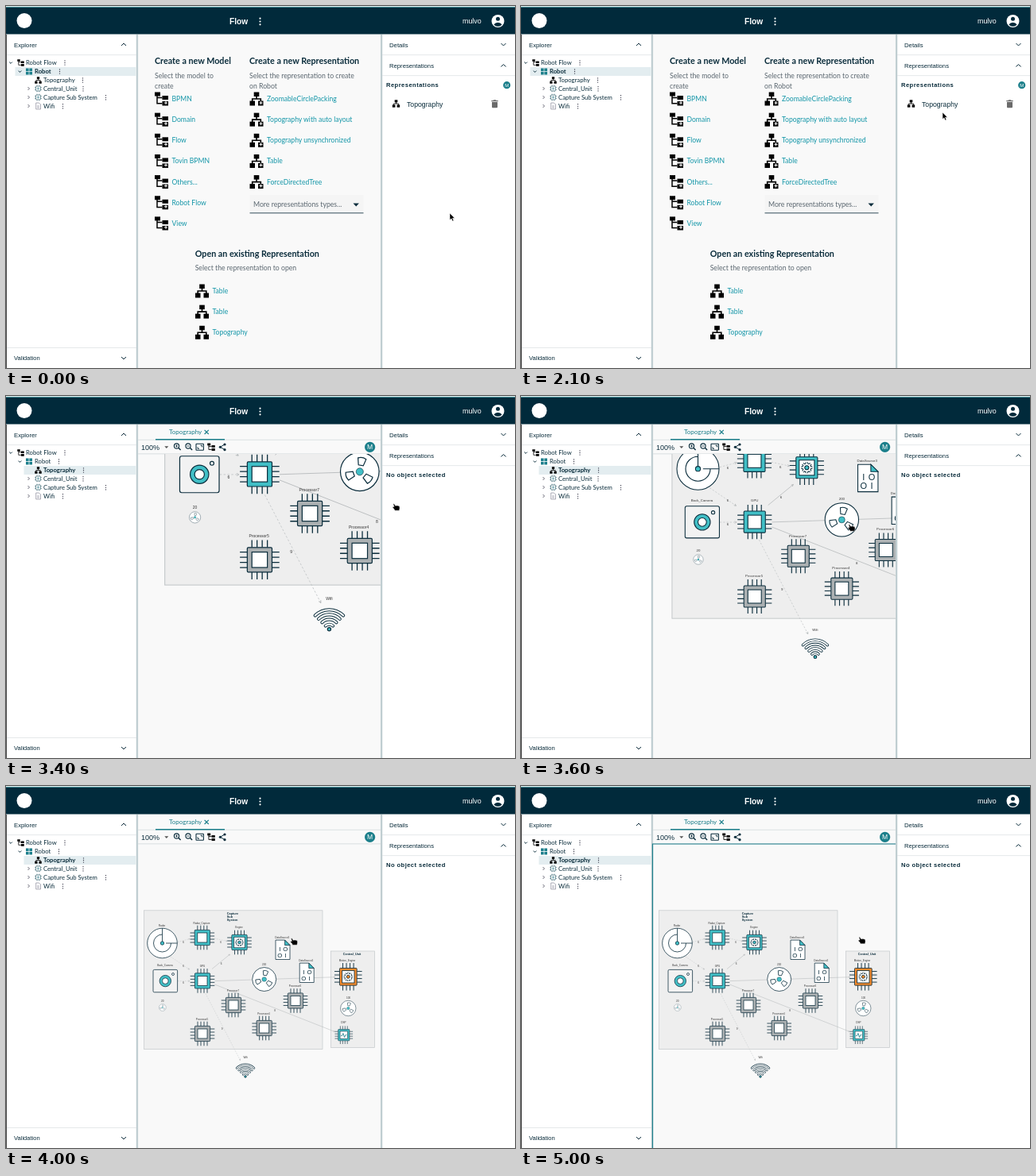
These frames come from a looping animation (640x456 px, 5.1 s). An HTML page:

```html
<!DOCTYPE html>
<html lang="en">
<head>
<meta charset="utf-8">
<title>Flow</title>
<style>
html, body { margin: 0; width: 100%; height: 100%; overflow: hidden; background: #fff; }
svg { display: block; width: 100vw; height: 100vh; }
text { font-family: "Liberation Sans", Arial, sans-serif; }
.lato { font-family: Lato, sans-serif; }
.line { fill: none; }
</style>
</head>
<body>
<svg id="stage" viewBox="0 0 640 456" xmlns="http://www.w3.org/2000/svg"></svg>
<script>
const LOOP = 5100, STEP = 100;
const OPEN = 2900, LOADED = 3400, FIT = 528, PICK = 4200, BLUR = 4700;
const INK = '#0b2d3c', TEAL = '#1c7f8b', LINK = '#1496a8', CHIP = '#41bfc6', GREY = '#abb0b2', ORANGE = '#f58b2c';

// Shape helpers; text is centred vertically on y.
const text = (x, y, s, size, fill = INK, more = '') =>
  `<text x="${x}" y="${y + size * .35}" font-size="${size}" fill="${fill}" ${more}>${s}</text>`;
const lato = (x, y, s, size, fill, more = '') => text(x, y, s, size, fill, 'class="lato" ' + more);
const rect = (x, y, w, h, fill, more = '') =>
  `<rect x="${x}" y="${y}" width="${w}" height="${h}" fill="${fill}" ${more}/>`;
const circle = (x, y, r, fill, more = '') => `<circle cx="${x}" cy="${y}" r="${r}" fill="${fill}" ${more}/>`;
const line = (d, stroke = INK, width = 1, more = '') =>
  `<path class="line" d="${d}" stroke="${stroke}" stroke-width="${width}" ${more}/>`;
const fill = (d, color = '#000') => `<path d="${d}" fill="${color}"/>`;
const at = (x, y, body, scale = 1) => `<g transform="translate(${x} ${y}) scale(${scale})">${body}</g>`;
const group = (id, body) => `<g id="${id}">${body}</g>`;
const bold = 'font-weight="700"', middle = 'text-anchor="middle"';

const chevron = (x, y, dir, r = 3) => line(`M${x - r} ${y - dir * r / 2}l${r} ${dir * r}l${r} ${-dir * r}`, INK, 1);
const arrowRight = (x, y) => line(`M${x - 1} ${y - 2}l2 2l-2 2`, '#445', .8);
const dots = (x, y, gap = 2.6, color = '#334', r = .65) =>
  [-1, 0, 1].map(i => circle(x, y + i * gap, r, color)).join('');
const badge = (x, y, r) => circle(x, y, r, TEAL) + text(x, y, 'M', r * 1.3, '#fff', middle);

// Icons centred on the origin, about 17 units wide
const plus = line('M5.5 3v4M3.5 5h4', '#fff', 1);
const modelIcon = rect(-8.5, -8.5, 7, 5, '#000') + rect(1, -4, 7.5, 5, '#000') + rect(1, 3, 7.5, 5.5, '#000') +
  line('M-5.5 -4V5.7H1M-5.5 -1.5H1', '#000', 1.5);
const lanIcon = rect(-3.3, -8.5, 6.6, 5.5, '#000') + rect(-8.5, 2.5, 6.5, 6, '#000') + rect(2, 2.5, 6.5, 6, '#000') +
  line('M0 -4V0M-5.3 3V0H5.3V3', '#000', 1.6);

function header() {
  return rect(0, 0, 640, 35.5, '#012a3b') + rect(0, 0, 640, 2, '#3f8a92') + rect(0, 0, 640, 1, '#e4eced') +
    circle(23, 18.5, 9.5, '#fff') +
    text(281, 19.3, 'Flow', 10.2, '#fff', bold) + dots(319.5, 19.5, 3.8, '#fff', 1.1) +
    text(574, 19.3, 'mulvo', 8.9, '#fff') +
    circle(618.5, 19, 8, '#fff') + circle(618.5, 16.3, 2.5, '#012a3b') +
    fill('M613.4 23.4Q615 20.8 618.5 20.8T623.6 23.4Q621.5 25.7 618.5 25.7T613.4 23.4', '#012a3b');
}

function panels() {
  const rule = (x, y, w) => rect(x, y, w, .8, '#dfe3e5');
  const sash = x => rect(x - 1.2, 36, 2.6, 420, '#dde4e6') + rect(x - .5, 36, 1.2, 420, '#aebfc3');
  return rect(0, 35, 640, 421, '#fff') + rect(165, 35, 306, 421, '#f9f9f9') +
    sash(164.8) + sash(472) + rect(0, 36, .9, 420, '#333') +
    text(10, 48.8, 'Explorer', 7.75) + chevron(148, 48.5, -1) + rule(1, 61.3, 163) +
    rule(1, 430, 163) + text(10, 443.6, 'Validation', 7.6) + chevron(148, 443.5, 1) +
    text(482, 48.8, 'Details', 7.75) + chevron(625.5, 48.5, 1) + rule(473, 61.3, 167) +
    text(482, 75, 'Representations', 7.7) + chevron(625.5, 75, -1) + rule(473, 87.3, 167);
}

function tree() {
  const cpu = rect(-3, -3, 6, 6, '#fff', 'rx="1" stroke="#4d7681" stroke-width=".8"') +
    rect(-1.4, -1.4, 2.8, 2.8, '#8fb9c0') +
    line('M-1.5 -4.4v1.4M1.5 -4.4v1.4M-1.5 3v1.4M1.5 3v1.4M-4.4 -1.5h1.4M-4.4 1.5h1.4M3 -1.5h1.4M3 1.5h1.4', '#4d7681', .6);
  const doc = line('M-2.8 -4H1L3 -2V4H-2.8Z', '#889', .7) + line('M-1.5 0h3M-1.5 2h3', '#889', .7);
  const grid = [[-4, -4], [.4, -4], [-4, .4], [.4, .4]].map(([x, y]) => rect(x, y, 3.6, 3.6, TEAL)).join('');
  const label = (x, y, s, end, on) => lato(x, y, s, 7.7, INK, on ? bold : '') + dots(end, y);
  const mark = (x, y) => rect(x, y, 163.5 - x, 11, '#e3edf0');
  return group('rowRobot', mark(11.5, 77) + label(36, 82.5, 'Robot', 67.5, true) + label(47, 93.5, 'Topography', 96.5)) +
    group('rowTopo', mark(22.5, 88) + label(36, 82.5, 'Robot', 66.5) + label(47, 93.5, 'Topography', 97.5, true)) +
    label(25, 71.5, 'Robot Flow', 74) + label(47, 104.3, 'Central_Unit', 97) +
    label(47, 115.3, 'Capture Sub System', 125.5) + label(47, 126.3, 'Wifi', 71.5) +
    chevron(6, 71.5, 1, 1.8) + chevron(17.5, 82.5, 1, 1.8) +
    [104, 115, 126].map(y => arrowRight(28.5, y)).join('') +
    at(18.5, 71.5, modelIcon, .5) + at(29, 82.5, grid) + at(40.5, 93.5, lanIcon, .5) +
    at(40.5, 104, cpu) + at(40.5, 115, cpu) + at(40.5, 126, doc);
}

function home() {
  const list = (x, top, icon, names) => names.map((s, i) => {
    const y = top + i * 26.15;
    return at(x + 8.5, y, icon) + lato(x + 21.5, y, s, 8.6, LINK);
  }).join('');
  const head = (x, y, s) => lato(x, y, s, 10.75, INK, bold);
  const note = (x, y, s) => lato(x, y, s, 8.7, '#5b6770');
  return head(187, 69.5, 'Create a new Model') + note(187, 88, 'Select the model to') + note(187, 100.5, 'create') +
    list(187, 117, modelIcon + plus, ['BPMN', 'Domain', 'Flow', 'Tovin BPMN', 'Others...', 'Robot Flow', 'View']) +
    head(306, 69.5, 'Create a new Representation') + note(306, 88, 'Select the representation to create') + note(306, 100.5, 'on Robot') +
    list(306.5, 117, lanIcon + plus, ['ZoomableCirclePacking', 'Topography with auto layout', 'Topography unsynchronized', 'Table', 'ForceDirectedTree']) +
    rect(306.5, 238, 143, 23, '#f5f5f5') + rect(306.5, 260.3, 143, 1, '#35505c') +
    note(311, 250.3, 'More representations types...') + fill('M436.5 248.5h7.4l-3.7 4z', INK) +
    head(237.7, 312, 'Open an existing Representation') + note(237.7, 330, 'Select the representation to open') +
    list(238, 359, lanIcon, ['Table', 'Table', 'Topography']) +
    text(478, 99.7, 'Representations', 7.6, INK, bold + ' letter-spacing=".45"') + badge(629.7, 99.7, 4.6) +
    at(490.5, 123, lanIcon, .55) + text(504, 123.8, 'Topography', 8.7) +
    fill('M611 121h7v6.3q0 1-1 1h-5q-1 0-1-1zM610.3 119h2.2l.6-.7h2.8l.6.7h2.2v1.2h-8.4z', '#6b6b6b');
}

function editor() {
  const lens = (x, sign) => circle(x, 63, 3.1, 'none', `stroke="${INK}" stroke-width="1.1"`) +
    line(`M${x + 2.3} 65.3l2.8 2.8`, INK, 1.4) + line(`M${x - 1.6} 63h3.2${sign}`, INK, .8);
  return rect(166, 54.8, 305, .8, '#d5dcde') + lato(205, 45.5, 'Topography', 8, TEAL) +
    line('M249.6 42.8l5.2 5.2m0-5.2l-5.2 5.2', TEAL, 1.2) + rect(188, 54, 87, 1.5, TEAL) +
    text(170, 64.6, '100%', 9) + fill('M199.3 63.3h5l-2.5 2.7z', '#555') +
    lens(214.5, 'm-1.6-1.6v3.2') + lens(229, '') +
    rect(239, 60.3, 9.4, 8, 'none', `stroke="${INK}" stroke-width="1.1" rx=".6"`) +
    line('M241 64.3v2h2M244.5 62.3h2v2', INK, .9) +
    at(258, 64.3, modelIcon, .56) +
    line('M275.3 60.8L269.3 64.3L275.3 67.8', INK, 1) +
    circle(269.4, 64.3, 1.6, INK) + circle(275, 61, 1.6, INK) + circle(275, 67.7, 1.6, INK) +
    rect(166, 72.5, 305, .8, '#cfd8da') +
    text(478, 99.7, 'No object selected', 7.6, INK, bold + ' letter-spacing=".43"');
}

// Diagram parts
const edge = `stroke="${INK}" stroke-width=".75"`;
const caption = (x, y, s) => text(x, y, s, 3.1, '#333', middle);

function gear(r, color) {
  const teeth = [0, 1, 2, 3, 4, 5, 6, 7].map(i => {
    const a = i * Math.PI / 4;
    return `M0 0L${Math.cos(a) * r} ${Math.sin(a) * r}`;
  }).join('');
  return line(teeth, INK, 2.4) + circle(0, 0, r * .82, INK) +
    line(teeth, '#fff', 1.1) + circle(0, 0, r * .82 - .65, '#fff') + circle(0, 0, r * .36, color, edge);
}

function chip(x, y, color, core = rect(-6, -6, 12, 12, '#fff', edge), scale = 1) {
  const pins = [-6, -2, 2, 6].map(p => `M${p} -15.3V-9.6M${p} 9.6V15.3M-15.3 ${p}H-9.6M9.6 ${p}H15.3`).join('');
  return at(x, y, line(pins, INK, .8) + rect(-9.6, -9.6, 19.2, 19.2, color, edge + ' rx=".8"') + core, scale);
}

function fan(x, y, r) {
  const blade = 'M-1.9 -5L-3.2 -10.4Q0 -12 3.2 -10.4L1.9 -5Z';
  return at(x, y, circle(0, 0, 15, '#fff', edge) +
    [10, 130, 250].map(a => `<path d="${blade}" fill="#fff" ${edge} transform="rotate(${a})"/>`).join('') +
    circle(0, 0, 2.8, CHIP, 'stroke="#0b2d3c" stroke-width=".4"'), r / 15);
}

function dataDoc(x, y) {
  const bits = (dy, a, b) => text(-3.8, dy, a, 7.8, INK, middle) + text(3.4, dy, b, 7.8, INK, middle);
  return at(x, y, `<path d="M-9 -12.2H2.6L9 -5.8V12.2H-9Z" fill="#fff" ${edge}/>` +
    `<path d="M2.6 -12.2V-5.8H9Z" fill="${CHIP}" ${edge}/>` + bits(-1, 'I', 'O') + bits(7, 'O', 'I'));
}

const radar = circle(0, 0, 18.8, '#fff', edge) +
  line('M0 0V-11A11 11 0 1 0 11 0M0 -18.8V-11M4.5 0H18.8', INK, .8) + circle(0, 0, 2.2, CHIP, edge);
const camera = rect(-15.3, -14.2, 30.6, 28.4, '#f2f2f2', edge + ' rx="1.5"') + circle(0, 0, 7.2, CHIP, edge) +
  circle(0, 0, 3.8, '#fff', edge) + circle(9.7, -8.6, 1.5, '#fff', edge);
const wifi = [15.5, 11.7, 7.9, 4.1].map(r => {
  const s = r * Math.SQRT1_2, arc = `M${-s} ${6.3 - s}A${r} ${r} 0 0 1 ${s} ${6.3 - s}`;
  return line(arc, INK, 2.5, 'stroke-linecap="round"') + line(arc, '#fff', 1.3, 'stroke-linecap="round"');
}).join('') + circle(0, 6, 1.3, CHIP, edge);

function diagram() {
  const box = (x, y, w, h) => rect(x, y, w, h, '#eee', 'stroke="#c4c8ca" stroke-width=".7"');
  const link = (d, dash = '') => line(d, dash ? '#bfc3c5' : '#b0b4b6', .5, (dash && 'stroke-dasharray="1.6 1.4" ') + 'marker-end="url(#tip)"');
  const wave = rect(-6.4, -6.4, 12.8, 12.8, '#fff', edge) + line('M-5 1h2.2l1.6-4 2.2 7 1.6-4H5', TEAL, 1.1);
  const cog = color => rect(-6.8, -6.8, 13.6, 13.6, '#fff', edge) + gear(5, color);
  const title = (x, y, s, anchor = '') => text(x, y, s, 3.8, INK, bold + anchor);
  return box(173.4, 156.8, 224.6, 174.8) + box(408.5, 208, 55, 121.5) +
    ['Capture', 'Sub', 'System'].map((s, i) => title(277.8, 160.6 + i * 3.9, s)).join('') +
    title(435, 212, 'Central_Unit', ' ' + middle) +
    link('M216 196.5L231 192.5', 1) + link('M262 192L278 195.5', 1) + link('M207 215L230.5 231', 1) +
    link('M216 245.7H231', 1) + link('M259 230.5L281.5 212') + link('M262.5 245.6L414 240.7') +
    link('M262.5 250L413.5 309.5') + link('M251 261.5L294.5 345.5', 1) +
    [[223, 197, 6], [270, 196.5, 6], [223, 226.5, 6], [270.5, 223.5, 6], [223, 247.5, 6], [338, 245, 10], [338, 282.5, 8], [271.5, 305.5, 9]]
      .map(([x, y, s]) => caption(x, y, s)).join('') +
    caption(196, 175.5, 'Radar') + at(196.5, 198, radar) +
    caption(246, 173.3, 'Radar_Capture') + chip(246.8, 191, CHIP) +
    caption(293, 178.3, 'Engine') + chip(293.5, 197, CHIP, cog(CHIP)) +
    caption(200, 226, 'Back_Camera') + at(200.3, 245.6, camera) +
    caption(196.8, 271, '20') + fan(196.8, 279, 4.4) +
    caption(247, 226.5, 'GPU') + chip(247, 245.4, CHIP) +
    caption(285.5, 257.8, 'Processor7') + chip(286, 276, GREY) +
    caption(363.5, 251.6, 'Processor6') + chip(364, 270.5, GREY) +
    caption(324, 286.5, 'Processor4') + chip(324.7, 305, GREY) +
    caption(246.5, 293.5, 'Processor5') + chip(247, 312, GREY) +
    caption(324.7, 225, '200') + fan(324.7, 243.5, 15) +
    caption(347.3, 191, 'DataSource3') + dataDoc(348, 206.3) +
    caption(377.3, 219.6, 'DataSource2') + dataDoc(378.2, 235.3) +
    caption(429, 219.6, 'Motion_Engine') + chip(430.3, 240.3, ORANGE, cog(ORANGE), 1.13) +
    caption(430.5, 267, '100') + fan(430.3, 280, 9.7) +
    caption(424.5, 298.3, 'DSP') + chip(424.8, 313.7, CHIP, wave, .74) +
    caption(301, 342, 'Wifi') + at(301, 360, wifi) +
    group('ring', rect(362.6, 222.1, 31.8, 26.2, 'none', `stroke="${TEAL}" stroke-width="1.8"`));
}

const cursor = group('arrow', `<path d="M0 0V8.6L2 6.8L3.4 9.9L4.9 9.2L3.5 6.2H6.2Z" fill="#000" stroke="#fff" stroke-width=".5"/>`) +
  group('hand', `<path d="M-3.6 -3.9Q-2.7 -4.6 -2 -3.6L-.9 -1.8Q2 -2.4 4.2 -1.2Q5 1 4 4.2H-1.6Q-2.4 1.8 -4.4 .6Q-4.4 -.8 -2.4 -.4Z" fill="#000" stroke="#fff" stroke-width=".4"/>`);

const stage = document.getElementById('stage');
stage.innerHTML = `<defs><clipPath id="pane">${rect(166, 73, 305, 383, '#000')}</clipPath>
  <marker id="tip" viewBox="0 0 4 4" refX="3.5" refY="2" markerWidth="5" markerHeight="5" orient="auto">${line('M.5 .5L3.5 2L.5 3.5', '#a8acae', .7)}</marker></defs>` +
  panels() + header() + tree() + group('home', home()) + group('editor', editor()) +
  group('loaded', badge(457.6, 64.3, 6.6) + `<g clip-path="url(#pane)">${group('diagram', diagram())}</g>`) +
  group('focus', line('M165.5 456V73H471', TEAL, 1.2)) +
  group('cursor', cursor);

const el = id => document.getElementById(id);
const show = (id, on) => el(id).setAttribute('display', on ? 'inline' : 'none');
const ease = u => u < .5 ? 2 * u * u : 1 - 2 * (1 - u) ** 2;

// Pointer route: time, x, y
const route = [
  [0, 558, 261], [400, 556, 250], [600, 556, 250], [800, 551, 226], [900, 551, 226], [1100, 548, 208],
  [1500, 545, 196], [2100, 530, 134], [2300, 528, 127], [3300, 528, 127], [3600, 415.5, 166],
  [3800, 353.5, 174], [3900, 354, 176], [4150, 374, 226], [4400, 351.5, 187], [4500, 351.5, 187],
  [4800, 428.5, 194.5], [LOOP, 428.5, 194.5]
];
function pointer(t) {
  const i = route.findIndex(k => k[0] > t), [t0, x0, y0] = route[i - 1], [t1, x1, y1] = route[i];
  const u = (t - t0) / (t1 - t0);
  return [x0 + (x1 - x0) * u, y0 + (y1 - y0) * u];
}

function draw(t) {
  const open = t >= OPEN, loaded = t >= LOADED;
  show('home', !open);
  show('rowRobot', !open);
  show('editor', open);
  show('rowTopo', open);
  show('loaded', loaded);
  show('ring', t >= PICK && t < BLUR);
  show('focus', t >= BLUR);
  show('arrow', !loaded);
  show('hand', loaded);
  // Fit to screen: exponential zoom with linear scroll
  const rest = 1 - ease(Math.min(1, Math.max(0, (t - LOADED) / FIT)));
  const zoom = Math.exp(.4825 * rest);
  const x = 165 - (165 - 13 * rest) * zoom, y = 73 - (73 + 156.7 * rest) * zoom;
  el('diagram').setAttribute('transform', `translate(${x} ${y}) scale(${zoom})`);
  el('cursor').setAttribute('transform', `translate(${pointer(t)})`);
}

function tick() {
  const t = performance.now() % LOOP;
  draw(Math.floor(t / STEP) * STEP);
  requestAnimationFrame(tick);
}
tick();
</script>
</body>
</html>
```
